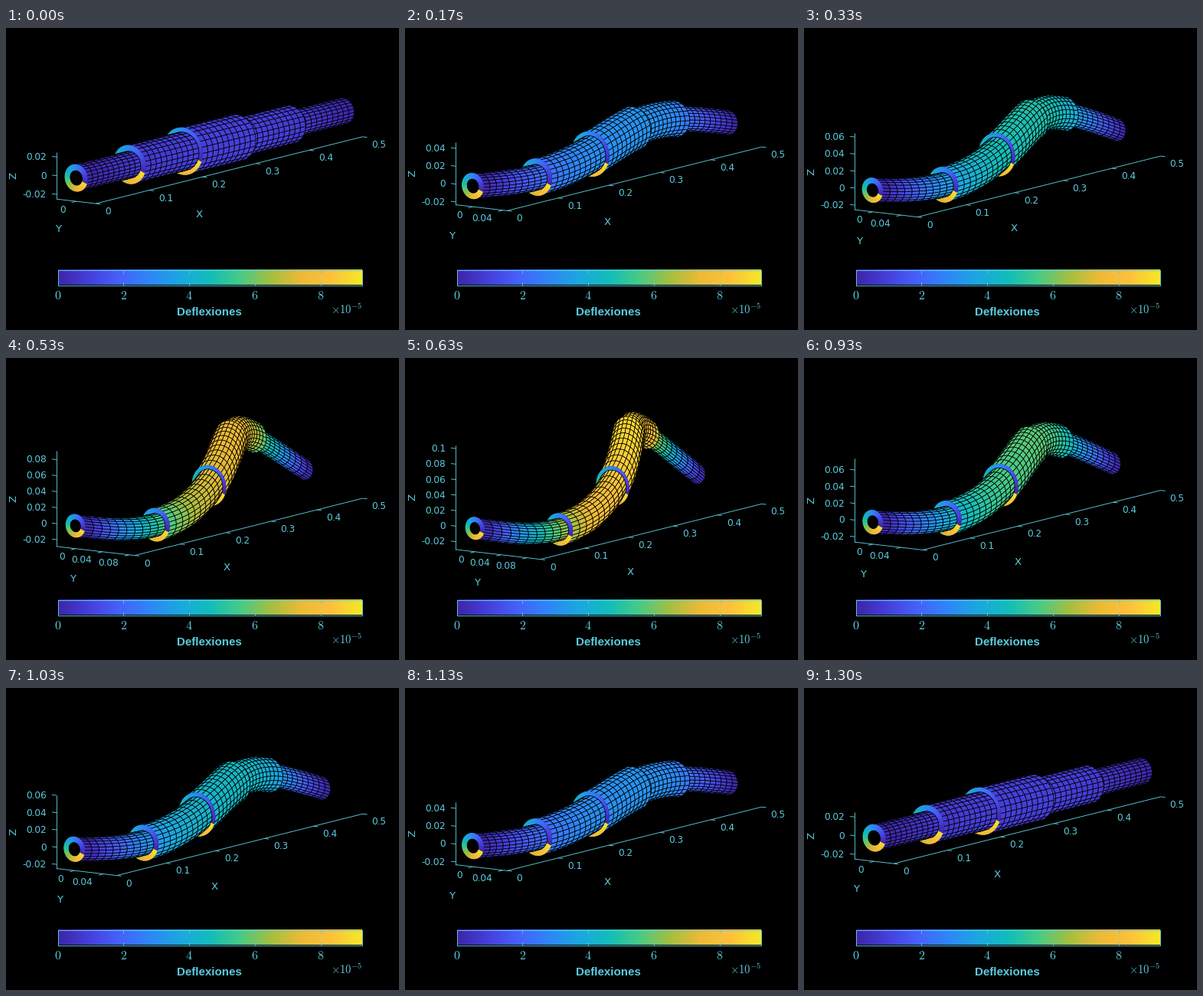
A matplotlib script that plays this animation: 513 by 394 pixels, repeating every 1.33 s.

```python
import numpy as np
import matplotlib.pyplot as plt
from matplotlib.animation import FuncAnimation
from matplotlib.collections import LineCollection, PolyCollection
from matplotlib.colors import LinearSegmentedColormap

W, H, DPI = 513, 394, 64
PT = 72 / DPI
FRAMES, LOOP = 40, 1330
INK = "#5accdf"

PARULA = LinearSegmentedColormap.from_list("parula", [
    "#3e26a8", "#463fdb", "#4661fb", "#2e87f7", "#1ca7e0", "#12bdba",
    "#48cb86", "#a3bf41", "#ecba36", "#fdc13c", "#f5e728"])

# Camera
AZ, EL = np.radians(55.8), np.radians(9.8)
CA, SA, CE, SE = np.cos(AZ), np.sin(AZ), np.cos(EL), np.sin(EL)
BOX_WIDTH, BOX_CX, BOX_CY = 399.5, 265.75, 152

# Stepped hollow shaft
LENGTH, SEG = 0.5, 0.1
RADII = [0.0143, 0.0205, 0.025, 0.0205, 0.0143]
BORE = 0.0085
CELLS, AROUND, RING_CELLS = 10, 24, 60
BEND_Y, BEND_Z = 0.083, 0.087
TUBE_ANGLES = np.linspace(0, 2 * np.pi, AROUND + 1)
RING_ANGLES = np.linspace(0, 2 * np.pi, RING_CELLS + 1) - np.radians(20)


def mode(x):
    p = np.pi * x / LENGTH
    return (np.sin(p) + 0.7 * np.sin(2 * p) - 0.1 * np.sin(3 * p)) / 1.475


def sway(x):
    """Full deflection in Y and Z."""
    return BEND_Y * mode(x), BEND_Z * mode(LENGTH - x)


def size(x):
    return np.hypot(*sway(x))


PEAK = size(np.linspace(0, LENGTH, 201)).max()


def grid(x, r, angles, amp):
    """Points of a surface of revolution whose axis is bent by amp."""
    x, r = np.asarray(x, float)[:, None], np.asarray(r, float)[:, None]
    v, w = sway(x)
    y = r * np.cos(angles) + amp * v
    z = r * np.sin(angles) + amp * w
    return np.stack([x + 0 * y, y, z], axis=-1)


def quads(g):
    q = np.stack([g[:-1, :-1], g[1:, :-1], g[1:, 1:], g[:-1, 1:]], axis=2)
    return q.reshape(-1, 4, 3)


def flatten(p):
    x, y, z = np.moveaxis(np.asarray(p, float), -1, 0)
    return np.stack([x * CA + y * SA, z * CE + SE * (x * SA - y * CA)], axis=-1)


def depth(p):
    x, y, z = np.moveaxis(p, -1, 0)
    return CE * (x * SA - y * CA) - z * SE


def shaft(amp, heat):
    """Quads, face colours and edge colours, far to near, plus Y/Z limits."""
    tube, tube_rgb = [], []
    for i, r in enumerate(RADII):
        x = np.linspace(i * SEG, (i + 1) * SEG, CELLS + 1)
        tube.append(quads(grid(x, np.full(x.size, r), TUBE_ANGLES, amp)))
        mid = (x[:-1] + x[1:]) / 2
        tube_rgb.append(np.repeat(PARULA(heat * size(mid) / PEAK), AROUND, axis=0))
    tube, tube_rgb = np.concatenate(tube), np.concatenate(tube_rgb)
    limits = [(tube[..., k].min(), tube[..., k].max()) for k in (1, 2)]

    flat = flatten(tube)
    d1, d2 = flat[:, 2] - flat[:, 0], flat[:, 3] - flat[:, 1]
    front = d1[:, 0] * d2[:, 1] - d1[:, 1] * d2[:, 0] > 0
    tube, tube_rgb = tube[front], tube_rgb[front]

    bands = [(0, BORE, RADII[0]), (SEG, RADII[0], RADII[1]),
             (2 * SEG, RADII[1], RADII[2])]
    rings = np.concatenate([quads(grid([x, x], [a, b], RING_ANGLES, amp))
                            for x, a, b in bands])
    ring_rgb = np.tile(PARULA((np.arange(RING_CELLS) + 0.5) / RING_CELLS),
                       (len(bands), 1))

    black = np.tile([0, 0, 0, 1.0], (len(tube), 1))
    q = np.concatenate([tube, rings])
    face = np.concatenate([tube_rgb, ring_rgb])
    edge = np.concatenate([black, ring_rgb])
    order = np.argsort(-depth(q.mean(axis=1)), kind="stable")
    return q[order], face[order], edge[order], limits


def make_camera(ylim, zlim):
    """Fit the data box to the stage; return a projector and its scale."""
    lo_u, hi_u = ylim[0] * SA, LENGTH * CA + ylim[1] * SA
    lo_h = flatten([0, ylim[1], zlim[0]])[1]
    hi_h = flatten([LENGTH, ylim[0], zlim[1]])[1]
    scale = BOX_WIDTH / (hi_u - lo_u)
    centre = np.array([lo_u + hi_u, lo_h + hi_h]) / 2

    def project(p):
        return (flatten(p) - centre) * [scale, -scale] + [BOX_CX, BOX_CY]
    return project, scale


fig = plt.figure(figsize=(W / DPI, H / DPI), dpi=DPI, facecolor="black")
ax = fig.add_axes([0, 0, 1, 1])
ax.axis("off")


def label(x, y, s, px=12.1, ha="center", family="DejaVu Sans", **kw):
    """Text whose digits and capitals are centred on y."""
    return ax.text(x, y + 0.365 * px, s, fontsize=px * PT, ha=ha, va="baseline",
                   color=INK, family=family, **kw)


def draw_colorbar():
    x0, x1, y0, y1 = 67.5, 464.5, 315.5, 335.5
    ax.imshow(np.linspace(0, 1, 256)[None], cmap=PARULA, aspect="auto",
              extent=(x0, x1, y1, y0), interpolation="bilinear")
    ax.plot([x0, x1, x1, x0, x0], [y0, y0, y1, y1, y0], color=INK, lw=0.9 * PT)
    for n in range(0, 10, 2):
        x = x0 + n * 42.9
        for a, b in ((y0, y0 + 4), (y1 - 4, y1)):
            ax.plot([x, x], [a, b], color=INK, lw=0.8 * PT)
        label(x, 348, f"${n}$", 16, math_fontfamily="cm")
    label(265.5, 369, "Deflexiones", 15.1, family="Liberation Sans", weight="bold")
    label(444.5, 368, r"$\times10^{-5}$", 14.5, math_fontfamily="cm")


draw_colorbar()
ax.set_xlim(0, W)
ax.set_ylim(H, 0)
lines = LineCollection([], colors=INK, linewidths=0.9 * PT, zorder=3)
body = PolyCollection([], linewidths=0.75 * PT, zorder=4)
ax.add_collection(lines)
ax.add_collection(body)
texts = []


def ticks(lim, step):
    first = np.ceil(lim[0] / step - 1e-6)
    last = np.floor(lim[1] / step + 1e-6)
    return np.arange(first, last + 1) * step


def number(v):
    return "0" if abs(v) < 1e-9 else f"{v:.2f}".rstrip("0")


def draw_axes(project, scale, ylim, zlim):
    (y0, y1), (z0, z1) = ylim, zlim
    corner, left = project([0, y1, z0]), project([0, y0, z0])
    far, top = project([LENGTH, y1, z0]), project([0, y0, z1])
    segs = [[top, left], [left, corner], [corner, far]]

    def tick(p, dx, dy):
        segs.append([p, p + [dx, dy]])

    for x in np.arange(6) * 0.1:
        p = project([x, y1, z0])
        tick(p, 6, 0.7)
        texts.append(label(p[0] + 12, p[1] + 9.5, number(x), ha="left"))
    y_ticks = ticks(ylim, 0.04)
    for y in y_ticks:
        p = project([0, y, z0])
        tick(p, -6, 1.5)
        texts.append(label(p[0] - 14, p[1] + 10, number(y), ha="right"))
    for z in ticks(zlim, 0.02):
        p = project([0, y0, z])
        tick(p, -6, -0.7)
        texts.append(label(53, p[1] - 0.5, number(z), ha="right"))
    lines.set_segments(segs)

    extra = LENGTH * CA * scale - 295.5
    mx, my = (corner + far) / 2
    texts.append(label(mx - 28 - 0.21 * extra, my + 52 + 0.08 * extra, "X", 13.3))
    mx, my = (left + corner) / 2
    dx = -24 if len(y_ticks) == 1 else -38 + 180 * (y1 - y0 - 0.0705)
    texts.append(label(mx + dx, my + 35.5, "Y", 13.3))
    texts.append(ax.text(9.5, (left[1] + top[1]) / 2, "Z", fontsize=13.3 * PT,
                         color=INK, family="DejaVu Sans", rotation=90,
                         ha="center", va="center"))


def update(k):
    while texts:
        texts.pop().remove()
    rise = min(k, FRAMES - 1 - k) / (FRAMES // 2 - 1)
    q, face, edge, (ylim, zlim) = shaft(rise, 0.1 + 0.9 * rise)
    project, scale = make_camera(ylim, zlim)
    body.set_verts(project(q))
    body.set_facecolor(face)
    body.set_edgecolor(edge)
    draw_axes(project, scale, ylim, zlim)
    return [body, lines, *texts]


anim = FuncAnimation(fig, update, frames=FRAMES, interval=LOOP / FRAMES,
                     init_func=lambda: [], repeat=True, repeat_delay=0, blit=False)
plt.show()
```
